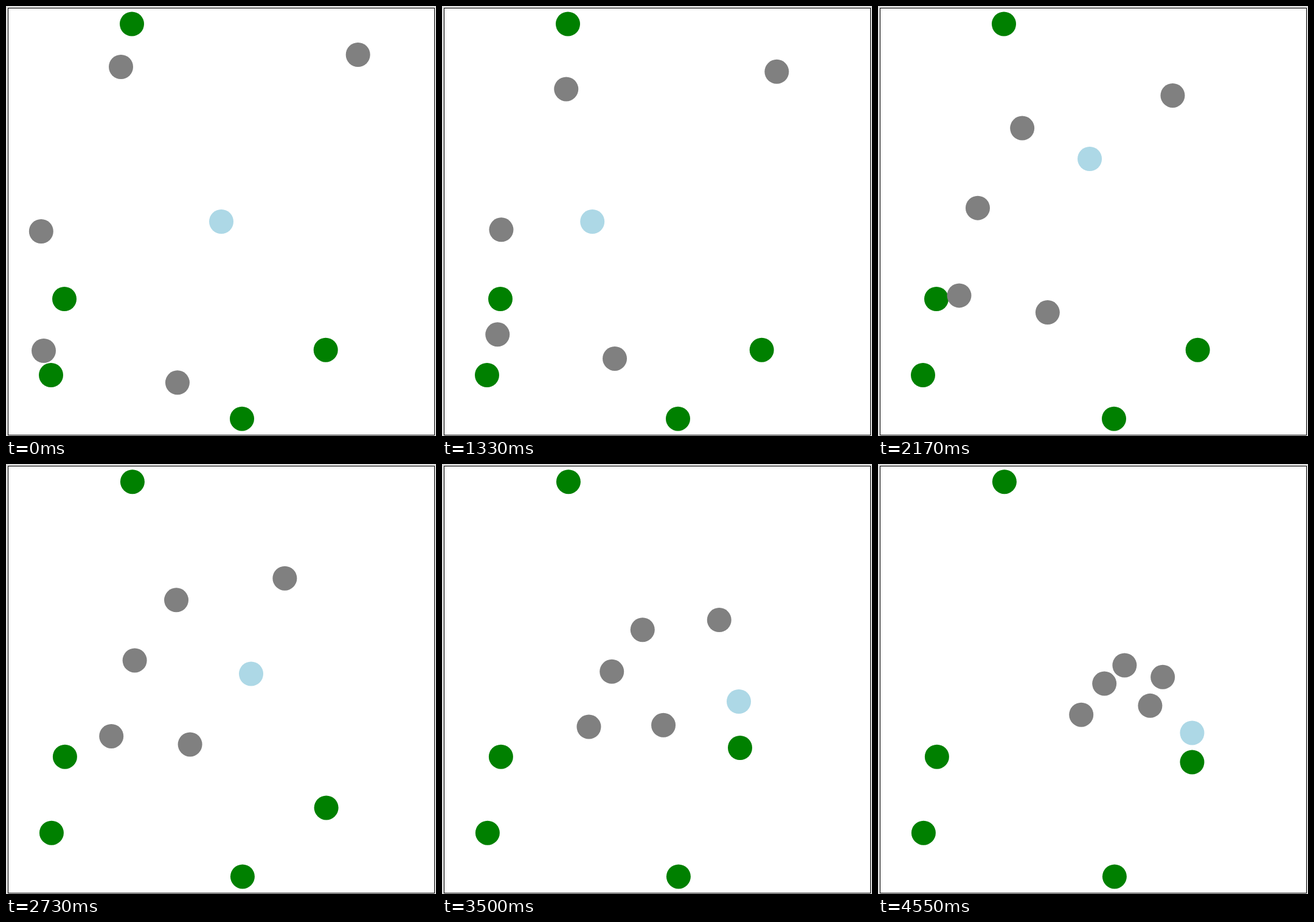
Recreate the animation shown at these times as an HTML page with a canvas. Size 707 by 706 pixels, loop 4620 ms.

```html
<!DOCTYPE html>
<html lang="en">
<head>
<meta charset="utf-8">
<title>Chase</title>
<style>
html, body { margin: 0; width: 100%; height: 100%; overflow: hidden; background: #ddd; }
canvas { position: absolute; left: 3px; top: 3px; border: 1px solid #000; background: #fff; }
</style>
</head>
<body>
<canvas id="field" width="700" height="700"></canvas>
<script>
const LOOP = 4620, HOLD = 980, STEP = 70, LAST = 52;
const SUBSTEPS = 4, CHASE_SPEED = 1.5;
const ctx = document.getElementById('field').getContext('2d');
ctx.translate(-4, -4);

// Key points: [step, x, y]
const playerPath = [
  [0, 354, 354], [1, 338, 354], [6.7, 234.5, 354], [12.5, 234.5, 251],
  [20.66, 403, 251], [28.6, 403, 390], [29.4, 403, 390], [34.4, 488, 390],
  [37, 488, 390], [38.7, 461, 368], [48, 461, 368], [52, 516.5, 441.5]
];
const home = [525.7, 564.7];
const followerPath = [
  [27, ...home], [32, 503, 519], [37, 490, 466], [44.3, ...home], [52, 516.5, 489.5]
];
const resting = [[207, 29.5], [96, 481], [74, 606], [388, 677.7]];
const chaserStarts = [[189, 100], [578.7, 80], [57.8, 370], [62, 566], [281.9, 618.3]];

function along(path, n) {
  let i = 1;
  while (i < path.length - 1 && path[i][0] < n) i++;
  const [n0, x0, y0] = path[i - 1], [n1, x1, y1] = path[i];
  const u = Math.min(1, Math.max(0, (n - n0) / (n1 - n0)));
  return [x0 + (x1 - x0) * u, y0 + (y1 - y0) * u];
}

// Game ticks passed at a step; the first half runs slightly ahead
const ticks = n => 4.25 * n + 1.5 * Math.max(0, Math.sin(Math.PI * n / 26));

// Head straight for the player at constant speed per tick
function pursue([x, y]) {
  const track = [[x, y]];
  for (let n = 1; n <= LAST; n++) {
    const move = CHASE_SPEED * (ticks(n) - ticks(n - 1)) / SUBSTEPS;
    for (let s = 1; s <= SUBSTEPS; s++) {
      const [px, py] = along(playerPath, n - 1 + s / SUBSTEPS);
      const d = Math.hypot(px - x, py - y);
      x += move * (px - x) / d;
      y += move * (py - y) / d;
    }
    track.push([x, y]);
  }
  return track;
}
const chasers = chaserStarts.map(pursue);

function dot([x, y], color) {
  ctx.fillStyle = color;
  ctx.beginPath();
  ctx.arc(x, y, 20, 0, Math.PI * 2);
  ctx.fill();
}

function draw(n) {
  ctx.clearRect(0, 0, 710, 710);
  const shift = [2, 3, 5].includes(n % 7) ? 0.9 : 0;
  const twitch = ([x, y]) => [x + shift, y - shift / 3];
  resting.forEach(p => dot(twitch(p), 'green'));
  dot(n < 27 ? twitch(home) : along(followerPath, n), 'green');
  chasers.forEach(track => dot(track[n], 'gray'));
  dot(along(playerPath, n), 'lightblue');
}

const start = performance.now();
function tick() {
  const t = (performance.now() - start) % LOOP;
  draw(t < HOLD ? 0 : Math.min(LAST, 1 + Math.floor((t - HOLD) / STEP)));
  requestAnimationFrame(tick);
}
tick();
</script>
</body>
</html>
```
